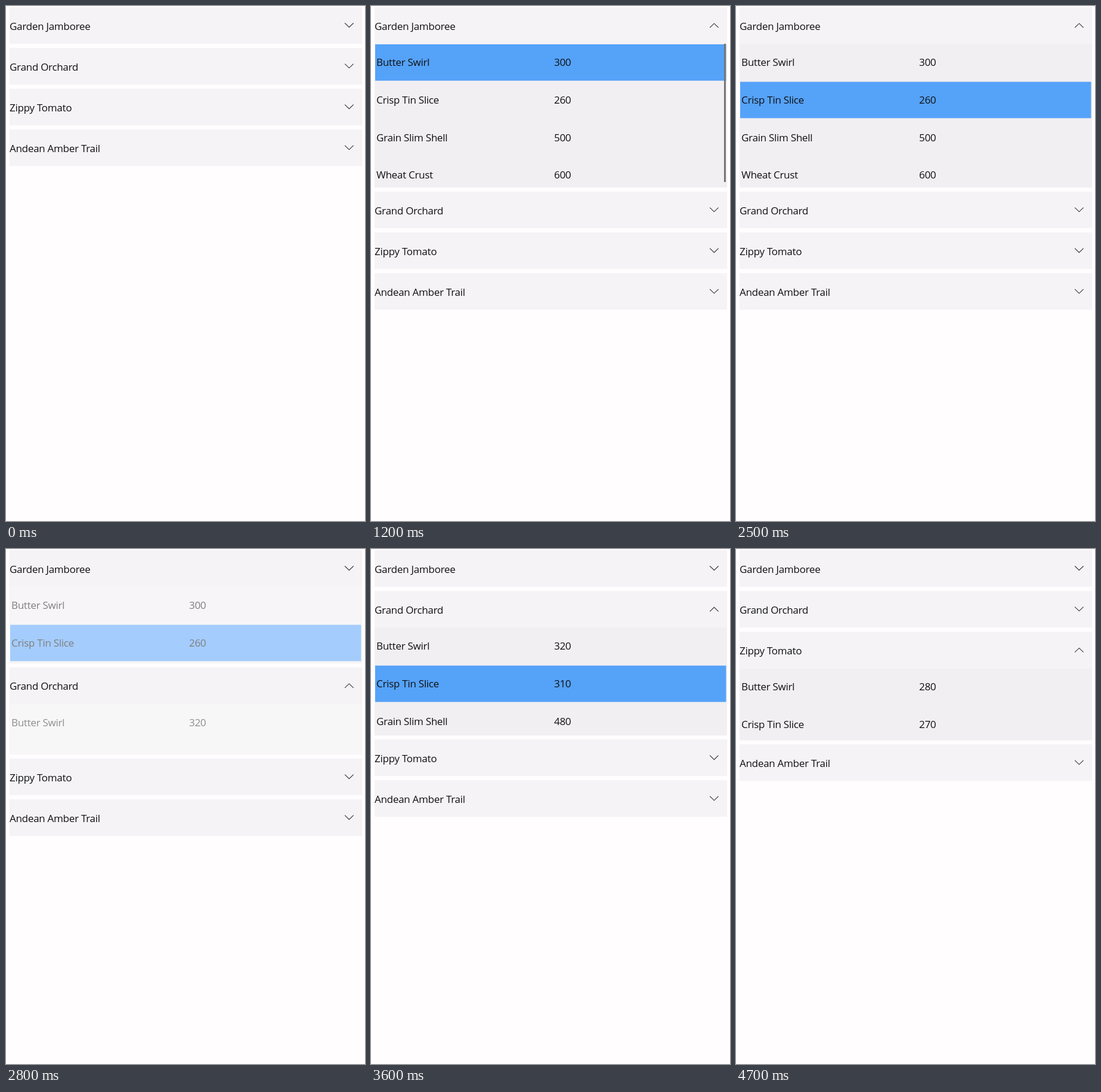
Animation of 600x860 px, one loop 5900 ms. Source, as an HTML page:

```html
<!DOCTYPE html>
<html lang="en">
<head>
<meta charset="utf-8">
<title>Accordion menu</title>
<style>
  html, body { margin: 0; width: 100%; height: 100%; overflow: hidden; background: #fffdfe; }
  svg { display: block; width: 600px; height: 860px; }
  text { font: 17px "Open Sans", "Noto Sans", sans-serif; letter-spacing: -0.3px; fill: #111; }
</style>
</head>
<body>
<svg id="stage" viewBox="0 0 600 860"></svg>
<script>
const LOOP = 5900, STEP = 100;
const TOP = 2, HEAD = 61, PITCH = 68.1, ROW = 62.6, ROW_SPACE = 60;
const LEFT = 6, WIDTH = 589;
const ARROW_DOWN = "M566.3 26.5L573.5 33.5L580.7 26.5";
const ARROW_UP = "M566.3 34.2L573.5 27.2L580.7 34.2";
const CRUSTS = ["Butter Swirl", "Crisp Tin Slice", "Grain Slim Shell", "Wheat Crust"];
const MENU = [
  { title: "Garden Jamboree", prices: [300, 260, 500, 600] },
  { title: "Grand Orchard", prices: [320, 310, 480] },
  { title: "Zippy Tomato", prices: [280, 270] },
  { title: "Andean Amber Trail", prices: [] }
];
// Panel switches: start, duration, panel that opens
const SWITCHES = [[483, 250, 0], [2683, 250, 1], [4450, 250, 2]];
// Row selections: time, panel, row
const PICKS = [[1200, 0, 0], [1700, 0, 1], [3600, 1, 1]];

const stage = document.getElementById("stage");

function add(parent, tag, attrs, content) {
  const el = document.createElementNS("http://www.w3.org/2000/svg", tag);
  set(el, attrs);
  if (content !== undefined) el.textContent = content;
  parent.appendChild(el);
  return el;
}

function set(el, attrs) {
  for (const key in attrs) el.setAttribute(key, attrs[key]);
}

const clamp = v => Math.max(0, Math.min(1, v));

function buildSection({ title, prices }, i) {
  const group = add(stage, "g", {});
  add(group, "rect", { x: LEFT, width: WIDTH, height: HEAD, fill: "#f5f3f6" });
  add(group, "text", { x: LEFT, y: 37.5 }, title);
  const arrow = add(group, "path", { fill: "none", stroke: "#333", "stroke-width": 1.1 });

  const clip = add(add(group, "clipPath", { id: "clip" + i }), "rect",
    { x: 0, y: HEAD, width: 600, height: 0 });
  const panel = add(group, "g", { "clip-path": `url(#clip${i})` });
  const full = prices.length * ROW_SPACE;
  add(panel, "rect", { x: LEFT, y: HEAD, width: WIDTH, height: full + 0.5, fill: "#f1eff1" });
  const mark = add(panel, "rect", { x: 7, width: 586.5, height: 60.7, fill: "#55a2f9" });
  prices.forEach((price, k) => {
    const y = HEAD + 37.3 + k * ROW;
    add(panel, "text", { x: 9, y }, CRUSTS[k]);
    add(panel, "text", { x: 306, y }, price);
  });
  return { group, arrow, clip, panel, mark, full };
}

const sections = MENU.map(buildSection);
const bar = add(stage, "rect", { x: 590, y: 63, width: 3, height: 231, rx: 0.5, fill: "#767676" });

function openness(i, t) {
  let value = 0;
  for (const [start, span, target] of SWITCHES) {
    const p = clamp((t - start) / span);
    if (p > 0) value = target === i ? p : value * (1 - p);
  }
  return value;
}

function draw(t) {
  const begun = SWITCHES.filter(s => t >= s[0]).pop();
  const active = begun ? begun[2] : -1;
  let shift = 0;

  sections.forEach((s, i) => {
    const open = openness(i, t);
    const height = s.full * open;
    const pick = PICKS.filter(p => p[1] === i && t >= p[0]).pop();
    set(s.group, { transform: `translate(0 ${TOP + i * PITCH + shift})` });
    set(s.arrow, { d: i === active ? ARROW_UP : ARROW_DOWN });
    set(s.clip, { height: height + 0.5 });
    set(s.panel, { opacity: open, visibility: open > 0 ? "visible" : "hidden" });
    set(s.mark, { y: HEAD + 1 + (pick ? pick[2] * ROW : 0), opacity: pick ? 1 : 0 });
    shift += height;
  });

  set(bar, { opacity: t < 1200 ? 0 : t < 2400 ? 1 : t < 2500 ? 0.5 : 0 });
}

const origin = performance.now();
function frame() {
  const t = (performance.now() - origin) % LOOP;
  draw(Math.floor(t / STEP) * STEP);
  requestAnimationFrame(frame);
}
frame();
</script>
</body>
</html>
```
